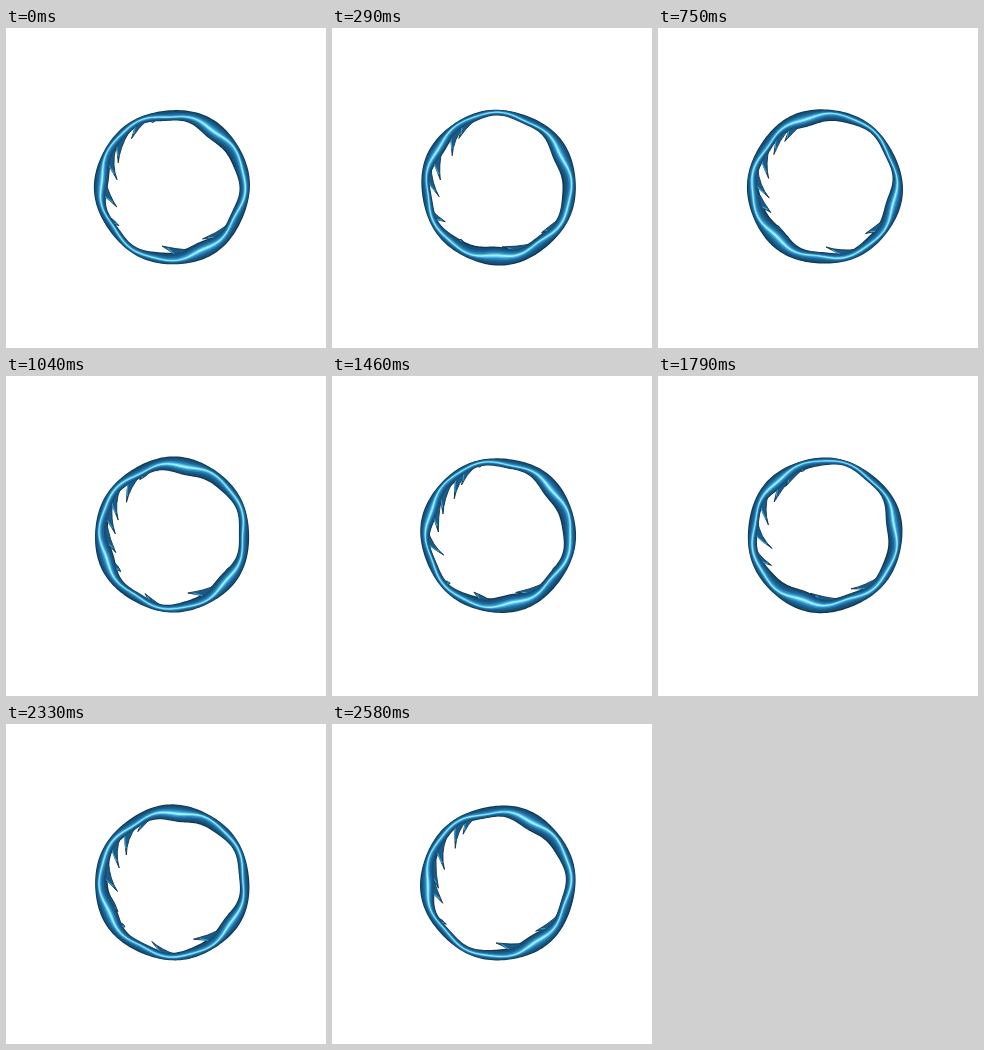
An HTML page with a canvas for the animation above (2630 ms loop, 320x320 px).

```html
<!DOCTYPE html>
<html lang="en">
<head>
<meta charset="utf-8">
<title>Liquid ring</title>
<style>
  html, body { margin: 0; width: 100%; height: 100%; overflow: hidden; background: #fff; }
  canvas { display: block; width: 320px; height: 320px; }
</style>
</head>
<body>
<canvas id="stage" width="320" height="320"></canvas>
<script>
const ctx = document.getElementById('stage').getContext('2d');
const LOOP = 2630, STEPS = 63, TAU = Math.PI * 2;
const CX = 166.5, CY = 159, RADIUS = 77.7;
const FLOW = 240;   // degrees the liquid travels per loop
const SWELL = 720;  // degrees the main swell travels per loop

// [inset towards the highlight, colour]
const layers = [
  [0, '#0f3650'], [.12, '#174f76'], [.34, '#1d6393'],
  [.56, '#2b87bd'], [.75, '#4cbbe8'], [.89, '#a6efff']
];

const rad = deg => deg * TAU / 360;
const cos = deg => Math.cos(rad(deg));
const mix = (a, b, k) => a + (b - a) * k;
const polar = (deg, r) => [CX + r * Math.cos(rad(deg)), CY + r * Math.sin(rad(deg))];

// Value in 0..1 that is fixed for each seed
function noise(seed) {
  const x = Math.sin(seed * 127.1 + 3.7) * 43758.5453;
  return x - Math.floor(x);
}

// 1 at the centre, falling smoothly to 0 at the given distance in degrees
function hump(deg, centre, reach) {
  const d = Math.abs(((deg - centre) % 360 + 540) % 360 - 180);
  return d < reach ? .5 + .5 * cos(180 * d / reach) : 0;
}

// Cross-section of the ring: three lobes drift along it under one fast swell
function makeBand(p) {
  return deg => {
    const u = deg - FLOW * p - 68;
    const lobe = cos(3 * u + 25 * Math.sin(rad(3 * u)));
    const swell = cos(deg + 30 - SWELL * p);
    const ripple = cos(9 * u + 40);
    const depth = Math.max(5, 12.3 + cos(deg - 70) + 3.3 * lobe + 2 * swell + .9 * ripple);
    const outer = RADIUS + .7 * lobe + .5 * cos(6 * u + 90);
    return {
      outer,
      inner: outer - depth,
      mid: outer - depth * (.48 + .13 * cos(3 * u + 100) + .07 * cos(9 * u)),
      glow: .6 + .4 * cos(6 * u + 30)
    };
  };
}

function drawLayer(band, inset, colour) {
  const inner = [];
  ctx.beginPath();
  for (let deg = 0; deg < 360; deg += 2) {
    const b = band(deg), f = mix(inset, 1, .5 * inset * (1 - b.glow));
    ctx.lineTo(...polar(deg, mix(b.outer, b.mid, f)));
    inner.push(polar(deg, mix(b.inner, b.mid, f)));
  }
  ctx.closePath();
  inner.forEach((p, i) => i ? ctx.lineTo(...p) : ctx.moveTo(...p));
  ctx.closePath();
  ctx.fillStyle = colour;
  ctx.fill('evenodd');
}

// Curved spike off the inner edge; way 1 points ahead of the flow, -1 behind it
function drawTip(band, end, way, reach, size) {
  if (size < .08) return;
  const span = 18 * size, at = end - way * span, b = band(at);
  const r = mix(b.inner + 2, reach, size);
  const root = polar(at + way * 2, b.mid);
  const bend = polar(at + way * span * .55, mix(b.inner, r, .4) + 1);
  ctx.beginPath();
  ctx.moveTo(...root);
  ctx.quadraticCurveTo(...bend, ...polar(end, r));
  ctx.quadraticCurveTo(...polar(at + way * span * .3, b.inner - 2),
                       ...polar(at - way * span * .5, b.inner + 2));
  ctx.closePath();
  ctx.fillStyle = '#1b5b87';
  ctx.strokeStyle = '#0f3650';
  ctx.lineWidth = .9;
  ctx.fill();
  ctx.stroke();
  ctx.beginPath();
  ctx.moveTo(...root);
  ctx.quadraticCurveTo(...bend, ...polar(mix(at, end, .7), mix(b.inner, r, .65)));
  ctx.strokeStyle = '#3a9fd2';
  ctx.lineWidth = 1.2;
  ctx.stroke();
}

// Hooks grow ahead of the flow at the bottom, ragged drops trail it on the left
function drawTips(band, p) {
  for (let i = 0; i < 9; i++) {
    const hook = 20 + 40 * i + FLOW * p;
    drawTip(band, hook, 1, 60, Math.min(1, 1.6 * hump(hook, 80, 60)));
  }
  for (let i = 0; i < 18; i++) {
    const drop = 20 * i + 12 * noise(i) + FLOW * p;
    drawTip(band, drop, -1, 54 + 7 * noise(i + 50), Math.min(1, 1.5 * hump(drop, 192, 75)));
  }
}

function draw(p) {
  const band = makeBand(p);
  ctx.clearRect(0, 0, 320, 320);
  layers.forEach(([inset, colour], i) => {
    drawLayer(band, inset, colour);
    if (i === 0) drawTips(band, p);
  });
}

const start = performance.now();
function tick() {
  const time = (performance.now() - start) % LOOP;
  const step = Math.floor((time + 5) / LOOP * STEPS) % STEPS;
  draw(step / STEPS);
  requestAnimationFrame(tick);
}
tick();
</script>
</body>
</html>
```
